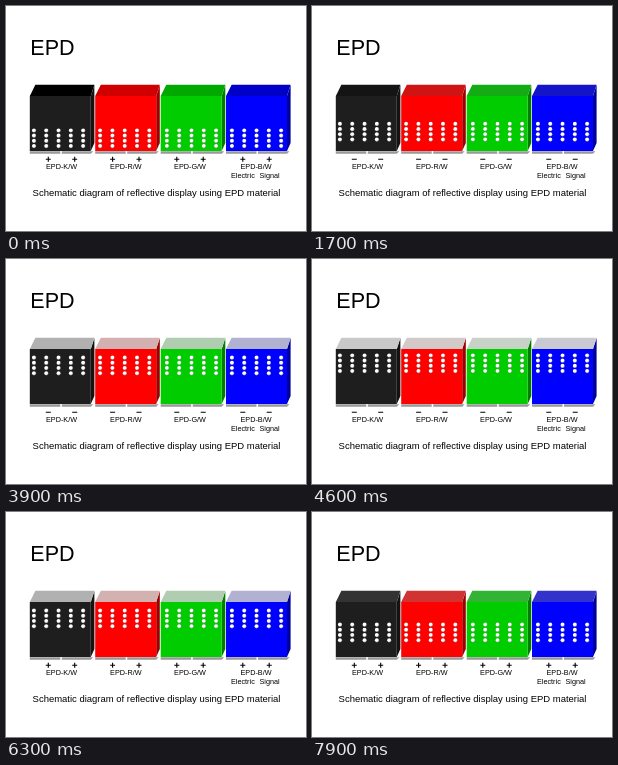
These frames come from a looping animation (300x225 px, 8 s). An HTML page:

```html
<!DOCTYPE html>
<html lang="en">
<head>
<meta charset="utf-8">
<title>EPD</title>
<style>
html, body { margin: 0; width: 100%; height: 100%; overflow: hidden; background: #fff; }
svg { display: block; width: 100vw; height: 100vh; font-family: "Liberation Sans", Arial, sans-serif; }
</style>
</head>
<body>
<svg id="stage" viewBox="0 0 300 225">
  <defs>
    <radialGradient id="bead" cx=".42" cy=".38" r=".65">
      <stop offset=".5" stop-color="#fff"/>
      <stop offset="1" stop-color="#8c8c8c"/>
    </radialGradient>
  </defs>
  <text x="24.3" y="49" font-size="21.5">EPD</text>
  <g id="cells"></g>
  <text x="225" y="171.5" font-size="7.25">Electric</text>
  <text x="253.5" y="171.5" font-size="7.25">Signal</text>
  <text x="26.6" y="190.3" font-size="9.48">Schematic diagram of reflective display using EPD material</text>
</svg>
<script>
const LOOP = 8000;
const TRAVEL_TIME = 3200;
const RISE = 950, FALL = 6050;
const SIGNAL_LEAD = 700;
const BEAD_TOP = 124.5, BEAD_TRAVEL = 28;
const cells = [
  { x: 23.8, beadX: 28, label: "EPD-K/W", labelX: 55.5, color: [30, 30, 30], lid: [0, 0, 0] },
  { x: 89.2, beadX: 94.2, label: "EPD-R/W", labelX: 119.8, color: [254, 0, 0], lid: [208, 0, 0] },
  { x: 154.7, beadX: 161, label: "EPD-G/W", labelX: 184, color: [0, 204, 0], lid: [0, 168, 0] },
  { x: 220, beadX: 226, label: "EPD-B/W", labelX: 250, color: [0, 0, 254], lid: [0, 0, 200] }
];
const layer = document.getElementById("cells");

function add(parent, tag, attrs, text) {
  const node = document.createElementNS("http://www.w3.org/2000/svg", tag);
  for (const key in attrs) node.setAttribute(key, attrs[key]);
  if (text) node.textContent = text;
  parent.appendChild(node);
  return node;
}

const rgb = c => `rgb(${c.map(Math.round).join()})`;
const clamp = v => Math.max(0, Math.min(1, v));
const progress = (t, start) => clamp((t - start) / TRAVEL_TIME);

function buildCell(cell) {
  const { x, color } = cell;
  add(layer, "path", { d: `M${x} 145.2h30.5v2.6h-30.5zM${x + 32} 145.2h31.5l-2.5 2.6h-29z`, fill: "#999" });
  add(layer, "path", { d: `M${x + 61} 90l3.6-11v58l-3.6 8z`, fill: rgb(color.map(v => v * .62)) });
  add(layer, "path", { d: `M${x} 90h61v55h-61z`, fill: rgb(color) });
  cell.top = add(layer, "path", { d: `M${x} 90l5.6-11.3h59l-3.6 11.3z` });
  cell.beads = add(layer, "g", { fill: "url(#bead)" });
  for (let i = 0; i < 20; i++) {
    add(cell.beads, "circle", { cx: cell.beadX + (i % 5) * 12.3, cy: Math.floor(i / 5) * 5.2, r: 2.1 });
  }
  add(layer, "text", { x: cell.labelX, y: 162.6, "font-size": 7.25, "text-anchor": "middle" }, cell.label);
  const arms = [cell.labelX - 13.2, cell.labelX + 13.2];
  const stroke = { stroke: "#000", "stroke-width": 1.1 };
  add(layer, "path", { d: arms.map(a => `M${a - 2.5} 153.2h5`).join(""), ...stroke });
  cell.plus = add(layer, "path", { d: arms.map(a => `M${a} 150.7v5`).join(""), ...stroke });
}

// The lid fades towards the light particles as they approach it.
function lidColor(lid, height) {
  const whiteness = .95 * height ** 1.6;
  return rgb(lid.map(v => v + (212 - v) * whiteness));
}

function render(time) {
  const t = Math.floor((time % LOOP) / 100) * 100;
  const height = progress(t, RISE) - progress(t, FALL);
  const positive = t < RISE - SIGNAL_LEAD || t >= FALL - SIGNAL_LEAD;
  for (const cell of cells) {
    cell.top.setAttribute("fill", lidColor(cell.lid, height));
    cell.beads.setAttribute("transform", `translate(0 ${BEAD_TOP - BEAD_TRAVEL * height})`);
    cell.plus.setAttribute("visibility", positive ? "visible" : "hidden");
  }
}

cells.forEach(buildCell);
const start = performance.now();
function tick() {
  render(performance.now() - start);
  requestAnimationFrame(tick);
}
tick();
</script>
</body>
</html>
```
